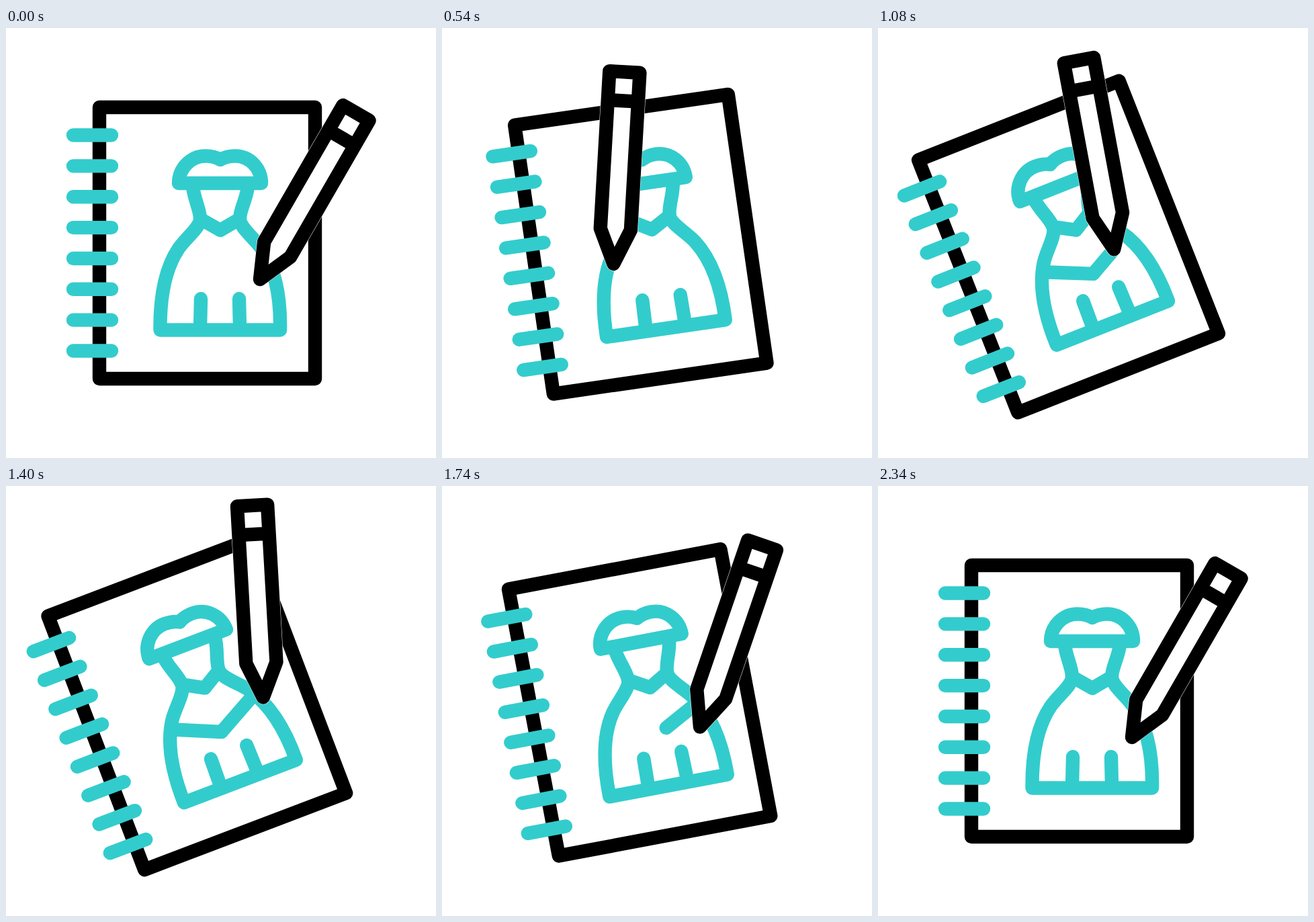
These frames come from a looping animation (640 px wide and 640 px high, 2400 ms). An HTML page:

```html
<!DOCTYPE html>
<html lang="en">
<head>
<meta charset="utf-8">
<title>Sketchbook</title>
<style>
  html, body { margin: 0; width: 100%; height: 100%; overflow: hidden; background: #fff; }
  svg { display: block; width: 100vw; height: 100vh; }
  g { fill: none; stroke-width: 20.4; stroke-linecap: round; stroke-linejoin: round; }
  .ink { stroke: #000; }
  .teal { stroke: #3cc; }
</style>
</head>
<body>
<svg viewBox="0 0 640 640">
  <g id="book">
    <path class="ink" d="M139 118H460V522H139Z"/>
    <g class="teal">
      <path id="rings"/>
      <path d="M257 231C257 209 275 190.5 297 190.5C305 190.5 313 192.5 319 196C325 192.5 333 190.5 341 190.5C363 190.5 380 209 380 231Z"/>
      <path d="M278 236C280 255 289 270 289 284L319 301L348 284C348 270 358 255 360 236"/>
      <path d="M289 284C289 297 268 312 257 328C238 356 229 398 229.5 449.5H408C409 398 399 356 380 328C369 312 348 297 348 284"/>
      <path d="M290 403L289 447M347 403L348 447"/>
      <path id="sash" d="M255 343L319 371L386 335"/>
    </g>
    <g id="pencil">
      <path d="M0 0L-22.6 -51.5V-286H22.6V-51.5Z" fill="#fff" stroke="#fff" stroke-width="21.4"/>
      <path class="ink" d="M0 0L-22.6 -51.5V-286H22.6V-51.5ZM-22.6 -243H22.6"/>
    </g>
  </g>
</svg>
<script>
const LOOP = 2400, REST = 2340, TURN = 1140;
const DRAW = 565, LIFT = 1205;
const [book, pencil, sash, rings] = ['book', 'pencil', 'sash', 'rings'].map(id => document.getElementById(id));
const sashLength = sash.getTotalLength();

rings.setAttribute('d', Array.from({ length: 8 }, (_, i) => `M100 ${159.5 + i * 45.86}H157`).join(''));

const span = (t, from, to) => Math.min(1, Math.max(0, (t - from) / (to - from)));
const smooth = u => u * u * (3 - 2 * u);
const mix = (a, b, u) => a + (b - a) * u;

// Cubic timing curve with handles (x1, 0) and (x2, 1)
function ease(u, x1, x2) {
  let lo = 0, hi = 1;
  for (let i = 0; i < 24; i++) {
    const s = (lo + hi) / 2, r = 1 - s;
    if (3 * s * r * r * x1 + 3 * s * s * r * x2 + s ** 3 < u) lo = s; else hi = s;
  }
  return smooth(lo);
}

const curve = (a, b, c, s) =>
  [0, 1].map(i => (1 - s) ** 2 * a[i] + 2 * s * (1 - s) * b[i] + s * s * c[i]);

function tipAt(t) {
  if (t < DRAW) return curve([378, 374], [316.5, 378], [255, 343], ease(span(t, 0, DRAW), .85, .45));
  if (t < LIFT) {
    const point = sash.getPointAtLength(sashLength * span(t, DRAW, LIFT));
    return [point.x, point.y];
  }
  return curve([386, 335], [413, 356], [378, 374], smooth(span(t, LIFT, 1820)));
}

function render(t) {
  const tilt = ease(span(t, 0, TURN), .8, .2) - ease(span(t, TURN, REST), .8, .2);
  book.setAttribute('transform',
    `translate(${-5.6 * tilt} ${60.5 * tilt}) rotate(${-21.55 * tilt} 150 320)`);

  const grip = smooth(span(t, 0, 600)) - smooth(span(t, 1140, 1800));
  pencil.setAttribute('transform', `translate(${tipAt(t)}) rotate(${mix(30, 11, grip)})`);

  const start = sashLength * smooth(span(t, 1400, 2020));
  const end = sashLength * span(t, DRAW, LIFT);
  sash.style.display = end > start ? '' : 'none';
  sash.setAttribute('stroke-dasharray', `0 ${start} ${end - start} ${sashLength * 2}`);
  // Skip the zero-length first dash so its round cap does not show
  sash.setAttribute('stroke-dasharray', `${end - start} ${sashLength * 2}`);
  sash.setAttribute('stroke-dashoffset', -start);
}

const origin = performance.now();
function tick() {
  render(Math.min((performance.now() - origin) % LOOP, REST));
  requestAnimationFrame(tick);
}
tick();
</script>
</body>
</html>
```
